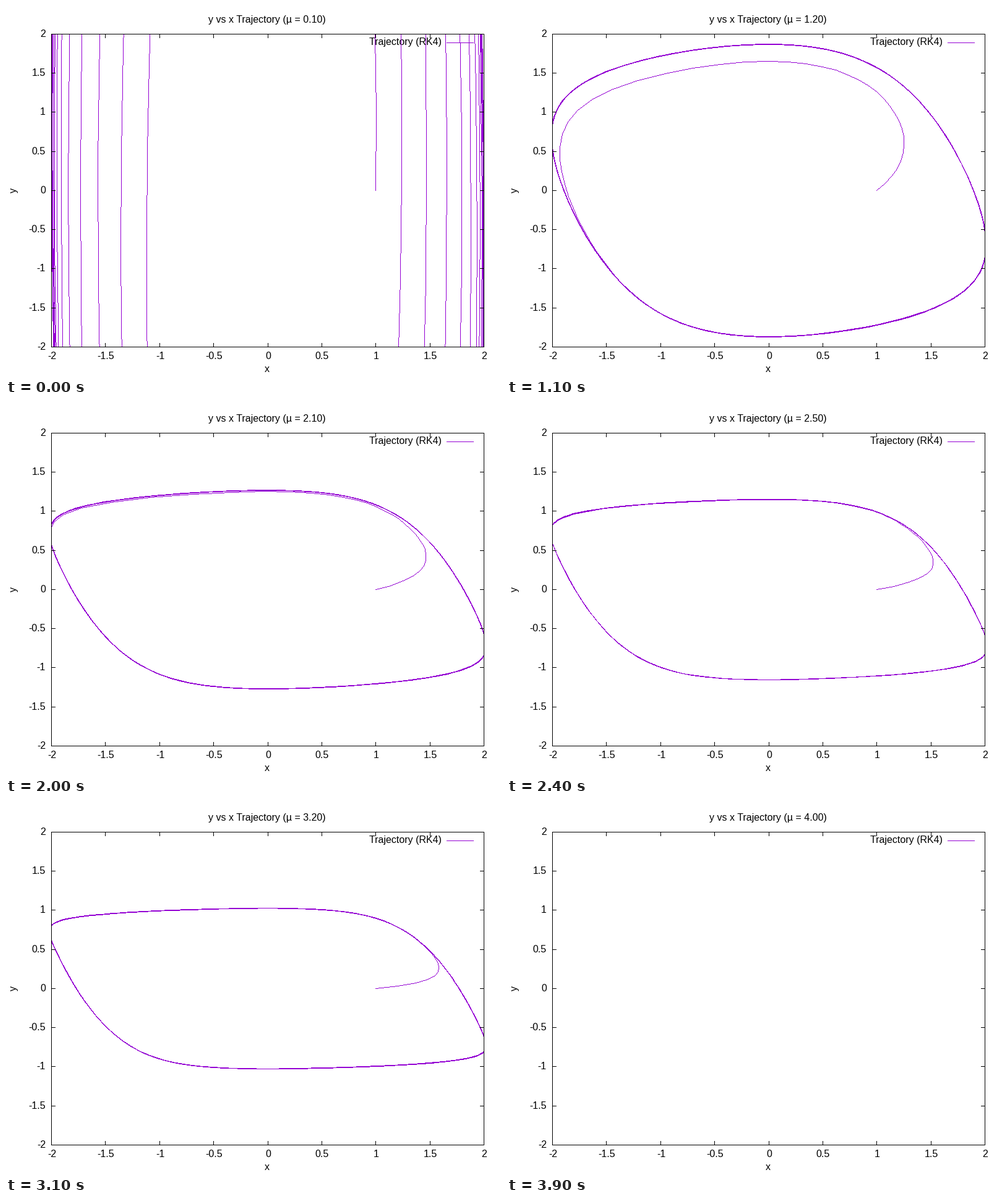
These frames come from a looping animation (800 px wide and 600 px high, 4000 ms). A matplotlib script:

```python
import numpy as np
import matplotlib.pyplot as plt
from matplotlib.animation import FuncAnimation
from matplotlib.patches import Rectangle

W, H = 800, 600
LEFT, RIGHT, TOP, BOTTOM = 73, 772, 45, 551
LIMIT = 2.0
PURPLE = (0x94, 0x00, 0xD3, 255)
FRAMES, INTERVAL = 40, 100
DT, STEPS = 0.1, 1000

plt.rcParams["font.family"] = "Liberation Sans"
plt.rcParams["font.size"] = 16
plt.rcParams["axes.unicode_minus"] = False

mus = 0.1 * np.arange(1, FRAMES + 1)


def lienard(state):
    """Van der Pol oscillator in Lienard form, for every mu at once."""
    x, y = state
    return np.array([mus * (x - x**3 / 3 - y), x / mus])


def integrate():
    state = np.array([np.ones(FRAMES), np.zeros(FRAMES)])
    path = [state]
    for _ in range(STEPS):
        k1 = lienard(state)
        k2 = lienard(state + DT / 2 * k1)
        k3 = lienard(state + DT / 2 * k2)
        k4 = lienard(state + DT * k3)
        state = state + DT / 6 * (k1 + 2 * k2 + 2 * k3 + k4)
        path.append(state)
    return np.array(path)


def to_px(x):
    scale = (RIGHT - LEFT) / (2 * LIMIT)
    return LEFT + np.floor((x + LIMIT) * scale + 0.5).astype(int)


def to_py(y):
    scale = (BOTTOM - TOP) / (2 * LIMIT)
    return BOTTOM - np.floor((y + LIMIT) * scale + 0.5).astype(int)


def rasterize(x, y):
    """Draw a hard-edged one-pixel polyline, clipped to the plot box."""
    px, py = to_px(x), to_py(y)
    dx, dy = np.diff(px), np.diff(py)
    n = np.maximum(abs(dx), abs(dy))
    seg = np.repeat(np.arange(len(n)), n)
    t = (np.arange(n.sum()) - (np.cumsum(n) - n)[seg]) / n[seg]
    cx = np.floor(px[seg] + dx[seg] * t + 0.5).astype(int)
    cy = np.floor(py[seg] + dy[seg] * t + 0.5).astype(int)
    inside = (cx >= LEFT) & (cx <= RIGHT) & (cy >= TOP) & (cy <= BOTTOM)
    layer = np.zeros((H, W, 4), np.uint8)
    layer[cy[inside], cx[inside]] = PURPLE
    return layer


fig = plt.figure(figsize=(W / 72, H / 72), dpi=72, facecolor="white")
ax = fig.add_axes([0, 0, 1, 1])
ax.axis("off")


def bar(x, y, w, h, color="black", z=4):
    ax.add_patch(Rectangle((x, y), w, h, fc=color, lw=0,
                           antialiased=False, zorder=z))


def label(x, y, text, ha="center", **kw):
    return ax.text(x, y, text, ha=ha, va="baseline", color="black",
                   zorder=1, **kw)


# Border, with ticks on all four sides
bar(LEFT, TOP, RIGHT - LEFT + 1, 1)
bar(LEFT, BOTTOM, RIGHT - LEFT + 1, 1)
bar(LEFT, TOP, 1, BOTTOM - TOP + 1)
bar(RIGHT, TOP, 1, BOTTOM - TOP + 1)
TICK = 7
for value in np.arange(-LIMIT, LIMIT + 0.1, 0.5):
    tx, ty = int(to_px(value)), int(to_py(value))
    bar(tx, TOP, 1, TICK)
    bar(tx, BOTTOM - TICK + 1, 1, TICK)
    bar(LEFT, ty, TICK, 1)
    bar(RIGHT - TICK + 1, ty, TICK, 1)
    label(tx + 1, 571, f"{value:g}")
    label(64, ty + 5, f"{value:g}", ha="right")

label(422, 592, "x")
ax.text(17, 298, "y", rotation=90, rotation_mode="anchor",
        ha="center", va="baseline", color="black")
label(704, 63, "Trajectory (RK4)", ha="right")
bar(712, 59, 44, 1, color="#9400d3", z=2)
title = label(327, 27, "", ha="left")

curve = ax.imshow(np.zeros((H, W, 4), np.uint8), extent=(0, W, H, 0),
                  interpolation="nearest", aspect="auto", zorder=3)
ax.set_xlim(0, W)
ax.set_ylim(H, 0)

paths = integrate()
layers = [rasterize(paths[:, 0, i], paths[:, 1, i]) for i in range(FRAMES)]
layers[-1][:] = 0  # the last parameter value has no curve


def draw(i):
    title.set_text(f"y vs x Trajectory (µ = {mus[i]:.2f})")
    curve.set_data(layers[i])
    return title, curve


anim = FuncAnimation(fig, draw, frames=FRAMES, interval=INTERVAL,
                     repeat=True, repeat_delay=0, blit=False)
plt.show()
```
